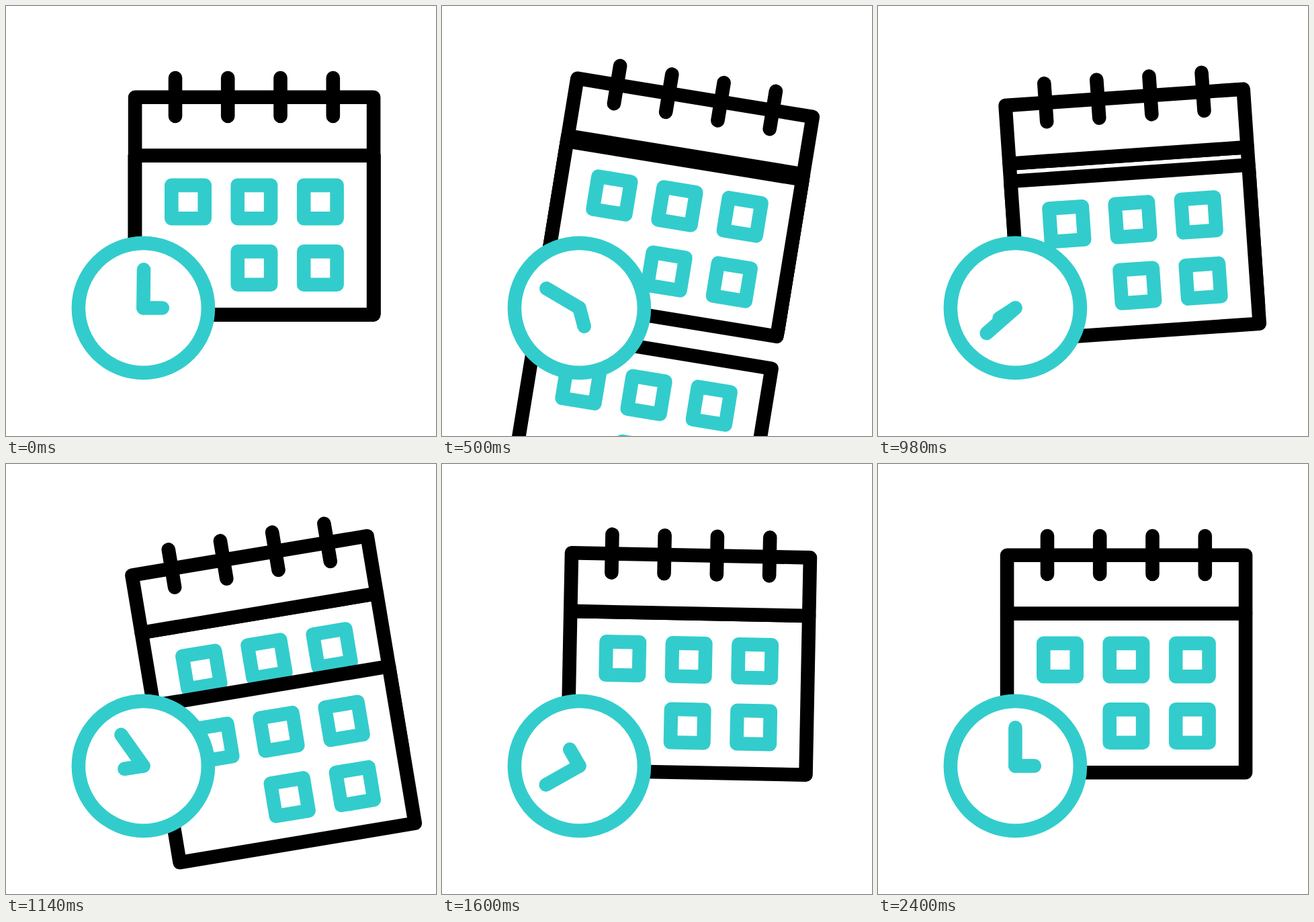
An HTML page that plays this animation: 640 px wide and 640 px high, repeating every 2420 ms.

```html
<!DOCTYPE html>
<html lang="en">
<head>
<meta charset="utf-8">
<title>Calendar and clock</title>
<style>
  html, body { margin: 0; width: 100%; height: 100%; overflow: hidden; background: #fff; }
  svg { display: block; width: 100%; height: 100%; }
  .ink, .teal { stroke-width: 20.6; stroke-linecap: round; stroke-linejoin: round; fill: #fff; }
  .ink { stroke: #000; }
  .teal { stroke: #33cccc; }
</style>
</head>
<body>
<svg viewBox="0 0 640 640" xmlns="http://www.w3.org/2000/svg">
  <defs>
    <rect id="cell" class="teal" x="-24.7" y="-24.7" width="49.4" height="49.4"/>
    <g id="page">
      <rect class="ink" x="192.1" y="222.5" width="355" height="236.7"/>
      <use href="#cell" x="271" y="291.6"/>
      <use href="#cell" x="369.4" y="291.6"/>
      <use href="#cell" x="467.9" y="291.6"/>
      <use href="#cell" x="369.4" y="390.1"/>
      <use href="#cell" x="467.9" y="390.1"/>
    </g>
  </defs>
  <g id="calendar">
    <use href="#page"/>
    <g id="falling"></g>
    <rect class="ink" x="192.1" y="135.8" width="355" height="86.7"/>
    <path class="ink" d="M252 107v57M330.2 107v57M408.5 107v57M486.8 107v57"/>
  </g>
  <circle class="teal" cx="204.4" cy="449.4" r="96.5"/>
  <path id="minute" class="teal" d="M204.4 449.4v-57"/>
  <path id="hour" class="teal" d="M204.4 449.4v-28.4"/>
</svg>
<script>
  const LOOP = 2420;
  const SPIN = 2400;
  const DROP = 580;
  // swing keys: [time in ms, degrees]
  const SWING = [[0, 0], [600, 10], [1200, -10], [1800, 5], [2240, 0]];
  const get = id => document.getElementById(id);
  const calendar = get('calendar'), minute = get('minute'), hour = get('hour');

  // the first page to fall lies on top of the pile
  const pages = [800, 400, 0].map(start => {
    const el = document.createElementNS('http://www.w3.org/2000/svg', 'use');
    el.setAttribute('href', '#page');
    get('falling').appendChild(el);
    return { el, start };
  });

  const smooth = u => u * u * (3 - 2 * u);

  function swing(t) {
    for (let i = 1; i < SWING.length; i++) {
      const [t0, a] = SWING[i - 1], [t1, b] = SWING[i];
      if (t < t1) return a + (b - a) * smooth((t - t0) / (t1 - t0));
    }
    return 0;
  }

  function fall(ms) {
    const s = Math.max(0, ms) / 100;
    return s * s * (7.55 + 0.164 * s * s);
  }

  const turn = (el, deg, x, y) => el.setAttribute('transform', `rotate(${deg} ${x} ${y})`);

  function draw(t) {
    turn(calendar, swing(t), 369.5, 179);
    for (const { el, start } of pages) {
      const age = t - start;
      el.setAttribute('y', fall(age));
      el.setAttribute('visibility', age < DROP ? 'visible' : 'hidden');
    }
    const spin = Math.min(t / SPIN, 1) * 360;
    turn(minute, spin * 4, 204.4, 449.4);
    turn(hour, 90 + spin, 204.4, 449.4);
  }

  const begin = performance.now();
  function tick() {
    draw((performance.now() - begin) % LOOP);
    requestAnimationFrame(tick);
  }
  draw(0);
  requestAnimationFrame(tick);
</script>
</body>
</html>
```
